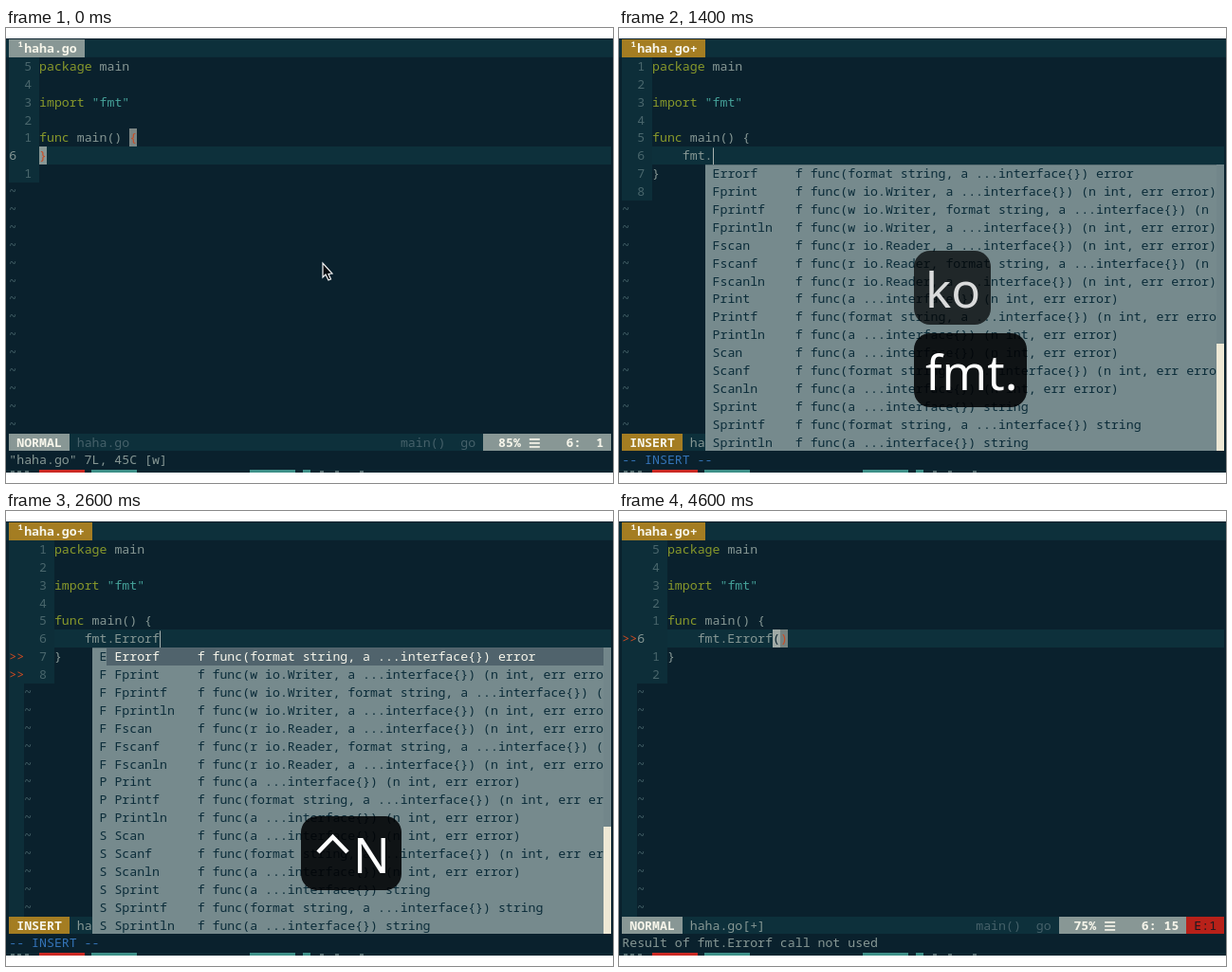
Write an HTML page with a canvas that moves like this. It is 640 px wide and 480 px high and loops after 4800 ms.

```html
<!DOCTYPE html>
<html lang="en">
<head>
<meta charset="utf-8">
<title>Editor session</title>
<style>
  html, body { margin: 0; width: 100%; height: 100%; overflow: hidden; background: #fff; }
  canvas { display: block; width: 640px; height: 480px; }
</style>
</head>
<body>
<canvas id="stage" width="640" height="480"></canvas>
<script>
const ctx = document.getElementById('stage').getContext('2d');
const LOOP = 4800, STEP = 200;
const CW = 7.935, RH = 18.89, LEFT = 3.3, TOP = 12;
const MONO = '"Noto Sans Mono", "DejaVu Sans Mono", monospace';
const C = {
  bg: '#0a212d', line: '#0d303b', gutter: '#0d2e39', num: '#49666c', text: '#869794',
  key: '#88992b', str: '#45a199', grey: '#889795', gold: '#a47d22', white: '#f6f5ea',
  dim: '#46616a', blue: '#3474b8', red: '#b82119', orange: '#cc4a22',
  menu: '#768a8d', menuText: '#0b2c39', selected: '#50636c', cream: '#eee8d5'
};

const W = 'w io.Writer, ', R = 'r io.Reader, ', F = 'format string, ';
const RESULT = ' (n int, err error)';
const MENU = [
  ['Errorf', F, ' error'],
  ['Fprint', W, RESULT], ['Fprintf', W + F, RESULT], ['Fprintln', W, RESULT],
  ['Fscan', R, RESULT], ['Fscanf', R + F, RESULT], ['Fscanln', R, RESULT],
  ['Print', '', RESULT], ['Printf', F, RESULT], ['Println', '', RESULT],
  ['Scan', '', RESULT], ['Scanf', F, RESULT], ['Scanln', '', RESULT],
  ['Sprint', '', ' string'], ['Sprintf', F, ' string'], ['Sprintln', '', ' string']
];

const colX = col => LEFT + col * CW;
const rowY = row => TOP + row * RH;

function rect(x, y, w, h, color) {
  ctx.fillStyle = color;
  ctx.fillRect(x, y, w, h);
}

function cells(col, row, n, color) {
  const x = Math.round(colX(col)), y = Math.round(rowY(row));
  rect(x, y, Math.round(colX(col + n)) - x, Math.round(rowY(row + 1)) - y, color);
}

function text(str, col, row, color, bold) {
  ctx.font = (bold ? 'bold ' : '') + '13.22px ' + MONO;
  ctx.fillStyle = color;
  ctx.fillText(str, colX(col), rowY(row) + 14);
}

function block(ch, col, row, bg, fg) {
  cells(col, row, 1, bg);
  text(ch, col, row, fg);
}

// Everything the editor shows at time t
function stateAt(t) {
  const insert = t >= 600 && t < 3600;
  const opened = t >= 600;
  const typed = t < 1000 ? '' : t < 1200 ? 'f' : t < 1400 ? 'fmt' : t < 2200 ? 'fmt.' : 'fmt.Errorf';
  return {
    t, insert, opened, typed,
    cursorLine: t >= 400 && t < 600 ? 5 : 6,
    shift: t >= 2200 ? 2 : 0,
    menu: t >= 1400 && t < 3000,
    parens: t >= 3000,
    errors: t < 2200 ? 0 : t < 3600 ? 3 : 1,
    signs: t < 2200 ? [] : t < 3000 ? [7, 8] : [6],
    accent: insert ? C.gold : C.grey
  };
}

function drawGutter(s) {
  const g = s.shift, count = s.opened ? 8 : 7;
  for (let row = 1; row <= 21; row++) {
    const current = row === s.cursorLine;
    if (current) cells(g + 4, row, 76 - g, C.line);
    if (row > count) {
      if (g) cells(0, row, 2, C.gutter);
      text('~', g, row, C.num);
      continue;
    }
    cells(0, row, g + 4, C.gutter);
    if (s.insert) text(row, g + 2, row, C.num);
    else if (current) text(row, g, row, C.text);
    else text(Math.abs(row - s.cursorLine), g + 2, row, C.num);
    if (s.signs.includes(row)) text('>>', 0, row, C.orange);
  }
}

function drawCode(s) {
  const c = s.shift + 4;
  text('package', c, 1, C.key);
  text('main', c + 8, 1, C.text);
  text('import', c, 3, C.key);
  text('"fmt"', c + 7, 3, C.str);
  text('func', c, 5, C.key);
  text('main() {', c + 5, 5, C.text);
  if (!s.opened) {
    text('}', c, 6, C.text);
    if (s.cursorLine === 6) {
      block('{', c + 12, 5, '#7c8684', C.orange);
      block('}', c, 6, C.grey, C.orange);
    } else {
      block('f', c, 5, C.grey, C.bg);
    }
    return;
  }
  text('}', c, 7, C.text);
  text(s.typed, c + 4, 6, C.text);
  const end = c + 4 + s.typed.length;
  if (s.parens) {
    block('(', end, 6, s.insert ? '#76827f' : '#a0aaa6', s.insert ? C.orange : C.bg);
    block(')', end + 1, 6, '#76827f', C.orange);
  }
  if (s.insert) {
    rect(Math.round(colX(end + (s.parens ? 1 : 0))), rowY(6) + 1, 1, RH - 1, '#a9b3b0');
  }
}

function drawBars(s) {
  rect(0, TOP, 640, RH, C.line);
  cells(0, 0, s.opened ? 11 : 10, s.accent === C.gold || s.opened ? C.gold : C.grey);
  text('¹haha.go' + (s.opened ? '+' : ''), 1, 0, C.white, true);

  cells(0, 22, 80, C.line);
  cells(0, 22, 8, s.accent);
  text(s.insert ? 'INSERT' : 'NORMAL', 1, 22, C.white, true);
  text('haha.go' + (s.opened ? '[+]' : ''), 9, 22, s.opened ? C.text : C.dim);

  const b = s.errors ? 58 : 63;
  text('main()  go', b - 11, 22, C.dim);
  cells(b, 22, s.errors ? 17 : 17, s.accent);
  const percent = s.opened ? 75 : s.cursorLine === 5 ? 71 : 85;
  const col = !s.opened ? 1 : !s.parens ? 5 + s.typed.length : s.insert ? 16 : 15;
  text(percent + '%', b + 2, 22, C.white, true);
  for (let i = 0; i < 3; i++) rect(colX(b + 6) + 1, rowY(22) + 5.5 + i * 4, 11, 1.7, C.white);
  text(s.cursorLine + ':' + String(col).padStart(3), b + 11, 22, C.white, true);
  if (s.errors) {
    cells(75, 22, 5, C.red);
    text('E:' + s.errors, 76, 22, '#1c1a1f');
  }

  if (s.insert) text('-- INSERT --', 0, 23, C.blue);
  else text(s.opened ? 'Result of fmt.Errorf call not used' : '"haha.go" 7L, 45C [w]', 0, 23, C.text);
}

function drawMenu(s) {
  const left = 11 + s.shift;
  ctx.save();
  ctx.beginPath();
  ctx.rect(0, rowY(7), colX(79), rowY(23) - rowY(7));
  ctx.clip();
  MENU.forEach(([name, args, result], i) => {
    const row = 7 + i, chosen = s.shift && i === 0;
    cells(11, row, 68, C.menu);
    if (s.shift) text(name[0], 12, row, C.menuText);
    if (chosen) cells(left, row, 79 - left, C.selected);
    const sig = name.padEnd(11) + 'f func(' + args + 'a ...interface{})' + result;
    text(sig.slice(0, 78 - left), left + 1, row, chosen ? C.white : C.menuText);
  });
  ctx.restore();
  for (let row = 7; row < 23; row++) cells(79, row, 1, row < 17 ? '#72868a' : C.cream);
}

function drawKeys(str, width, y, alpha) {
  ctx.save();
  ctx.globalAlpha = alpha;
  ctx.fillStyle = 'rgba(0, 2, 4, .87)';
  ctx.beginPath();
  ctx.roundRect(311, y, width, 78, 17);
  ctx.fill();
  ctx.font = '51px "Noto Sans", "Open Sans", sans-serif';
  ctx.fillStyle = ctx.strokeStyle = '#fff';
  let x = 323;
  if (str[0] === '^') {
    ctx.lineWidth = 4.5;
    ctx.beginPath();
    ctx.moveTo(329, y + 38);
    ctx.lineTo(344.5, y + 22);
    ctx.lineTo(360, y + 38);
    ctx.stroke();
    str = str.slice(1);
    x = 366;
  }
  ctx.fillText(str, x, y + 60);
  ctx.restore();
}

function drawOverlay(t) {
  const low = 322, high = 235;
  // Full until the fade starts, then out over the given span
  const fade = (start, span) => Math.max(0, Math.min(1, 1 - (t - start) / span));
  if (t >= 400 && t < 600) drawKeys('k', 52, low, 1);
  if (t >= 600 && t < 1000) drawKeys('ko', 81, low, 1);
  if (t >= 1000 && t < 1800) drawKeys('ko', 81, high, fade(1320, 480));
  if (t >= 1000 && t < 1200) drawKeys('f', 42, low, 1);
  if (t >= 1200 && t < 1400) drawKeys('fmt', 106, low, 1);
  if (t >= 1400 && t < 2200) drawKeys('fmt.', 119, low, fade(1800, 400));
  if (t >= 2200 && t < 3000) drawKeys('^N', 106, low, fade(2600, 400));
  if (t >= 3000 && t < 3600) drawKeys('(', 41, low, fade(3200, 400));
  if (t >= 3600 && t < 4600) drawKeys('^[', 86, low, fade(4200, 400));
}

function drawPointer() {
  const points = [[334, 248], [334, 263], [337, 260], [340, 266], [342.5, 265], [340, 259.5], [344, 259]];
  ctx.beginPath();
  points.forEach(([x, y]) => ctx.lineTo(x, y));
  ctx.closePath();
  ctx.fillStyle = '#080c10';
  ctx.strokeStyle = '#f4f4f4';
  ctx.lineWidth = 1.2;
  ctx.fill();
  ctx.stroke();
}

function drawFooter() {
  rect(0, 466, 640, 3, '#0b2731');
  rect(35, 466, 48, 3, '#cc2a24');
  for (const [x, w] of [[90, 48], [257, 48], [313, 8]]) rect(x, 466, w, 3, '#3f9189');
  for (const x of [5, 12, 20, 331, 347, 373]) rect(x, 467, 4, 2, '#5d7376');
}

function draw(t) {
  const s = stateAt(t);
  rect(0, 0, 640, 480, '#fff');
  rect(0, 11, 640, 458, C.bg);
  drawGutter(s);
  drawCode(s);
  drawBars(s);
  drawFooter();
  if (s.menu) drawMenu(s);
  if (t < 400) drawPointer();
  drawOverlay(t);
}

const start = performance.now();
function tick() {
  const t = (performance.now() - start) % LOOP;
  draw(Math.floor(t / STEP) * STEP);
  requestAnimationFrame(tick);
}
tick();
</script>
</body>
</html>
```
